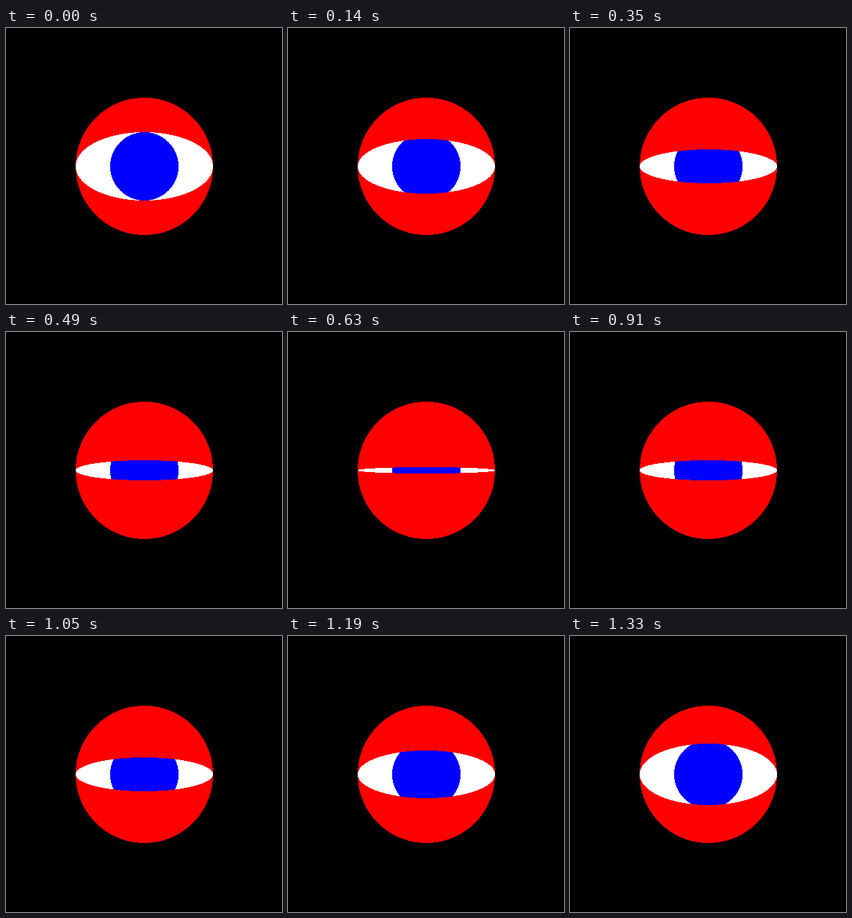
Recreate the animation shown at these times as an HTML page with a canvas. Size 400 px wide and 400 px high, loop 1.4 s.

```html
<!DOCTYPE html>
<html lang="en">
<head>
<meta charset="utf-8">
<title>Blinking eye</title>
<style>
html, body { margin: 0; width: 100%; height: 100%; overflow: hidden; background: #000; }
canvas { display: block; width: 400px; height: 400px; image-rendering: pixelated; }
</style>
</head>
<body>
<canvas id="stage" width="400" height="400"></canvas>
<script>
const ctx = document.getElementById('stage').getContext('2d');
const CENTER = 200.5, RADIUS = 99.5, IRIS = 49.5;
const STEP = 70, STEPS = 20;

// Half width of an ellipse at vertical distance dy from its middle
function halfWidth(rx, ry, dy) {
  return Math.abs(dy) < ry ? rx * Math.sqrt(1 - (dy / ry) ** 2) : 0;
}

// Fills whole pixel rows so that the edges stay hard
function fillRows(color, widthAt) {
  ctx.fillStyle = color;
  for (let y = 100; y < 302; y++) {
    const w = widthAt(y + 0.5 - CENTER);
    const left = Math.round(CENTER - w);
    const right = Math.round(CENTER + w);
    if (right > left) ctx.fillRect(left, y, right - left, 1);
  }
}

function draw(step) {
  // The lid closes evenly, then opens
  const open = 5 * Math.abs(10 - step) - 0.5;
  const disc = dy => halfWidth(RADIUS, RADIUS, dy);
  const eye = dy => halfWidth(RADIUS, open, dy);
  const iris = dy => halfWidth(IRIS, IRIS, dy);

  ctx.fillStyle = '#000';
  ctx.fillRect(0, 0, 400, 400);
  fillRows('#f00', disc);
  fillRows('#fff', eye);
  fillRows('#00f', dy => Math.min(eye(dy), iris(dy)));
}

const start = performance.now();
function tick(now) {
  const t = Math.max(0, now - start);
  draw(Math.floor(t / STEP) % STEPS);
  requestAnimationFrame(tick);
}
draw(0);
requestAnimationFrame(tick);
</script>
</body>
</html>
```
